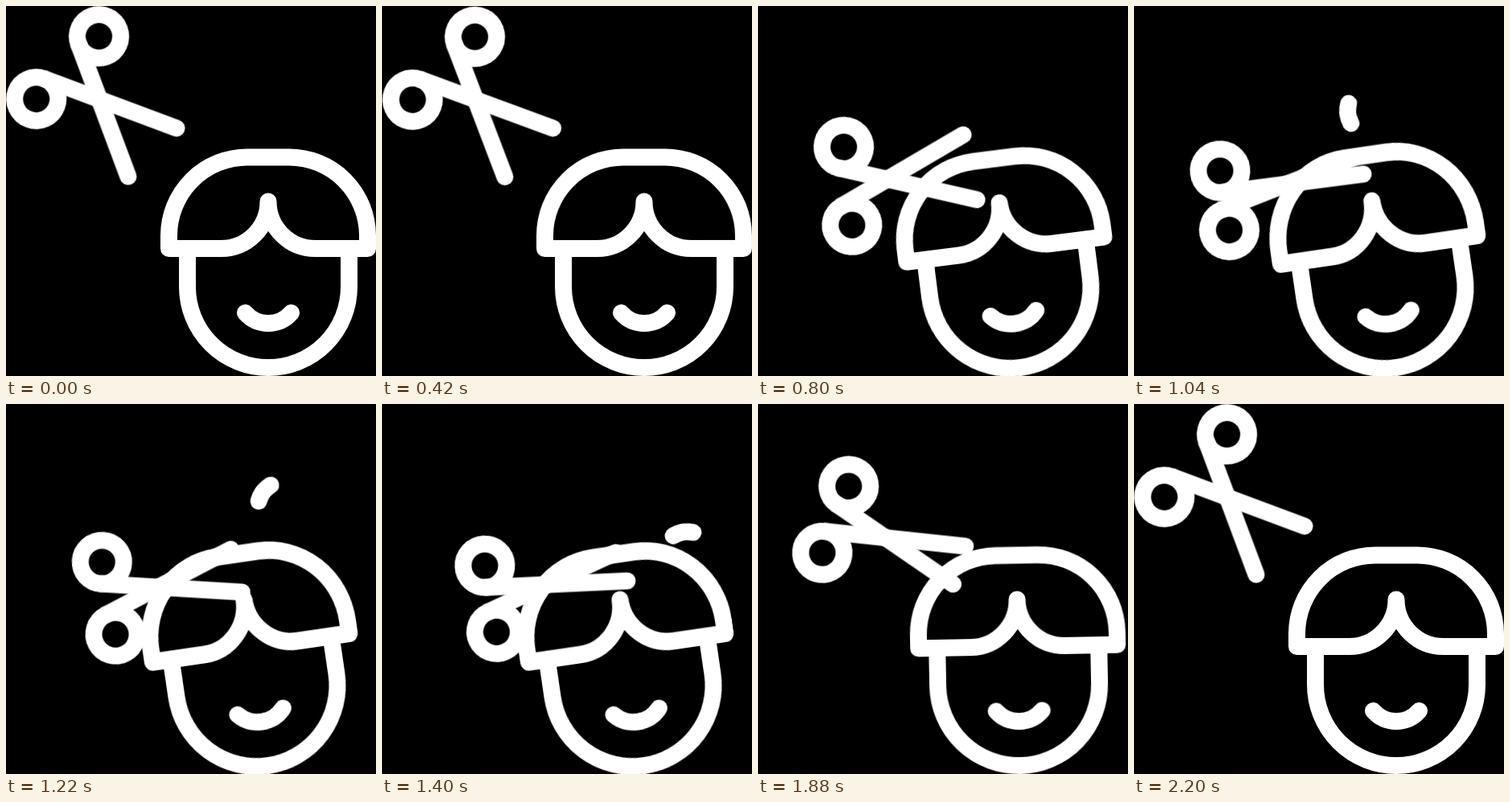
Write an HTML page that moves like this. It is 460x460 px and loops after 2.4 s.

```html
<!DOCTYPE html>
<html lang="en">
<head>
<meta charset="utf-8">
<title>Haircut</title>
<style>
html, body { margin: 0; width: 100%; height: 100%; overflow: hidden; background: #000; }
svg {
  display: block; width: 100%; height: 100%;
  fill: none; stroke: #fff; stroke-width: 21; stroke-linecap: round; stroke-linejoin: round;
}
g { animation: 2.4s linear infinite; }

.head { transform-origin: 326px 449.5px; animation-name: tilt; }
.hair { transform-origin: 326px 301.5px; animation-name: lift; }
.top { animation-name: top-blade; }
.low { animation-name: low-blade; }
.drift { animation-name: drift; }
.arc { animation-name: arc; }
.spin { animation-name: spin; }
.show { animation-name: show; }

@keyframes tilt {
  0%, 16.667% { transform: rotate(0deg); animation-timing-function: cubic-bezier(.36, 0, .4, 1); }
  41.667%, 61.667% { transform: rotate(-8.3deg); animation-timing-function: cubic-bezier(.36, 0, .4, 1); }
  86.667%, 100% { transform: rotate(0deg); }
}
/* The hair rises a little while it is cut */
@keyframes lift {
  0%, 35% { transform: scaleY(1); animation-timing-function: ease-in-out; }
  43.333% { transform: scaleY(1.045); }
  58.333% { transform: scaleY(1.03); animation-timing-function: ease-out; }
  72%, 100% { transform: scaleY(1); }
}

/* Swing in, snip twice, swing back */
@keyframes top-blade {
  0%, 16.667% { transform: translate(115.5px, 114.6px) rotate(69.5deg); animation-timing-function: cubic-bezier(.333, 0, .667, .42); }
  24.167% { transform: translate(134.3px, 151px) rotate(51deg); animation-timing-function: cubic-bezier(.333, .333, .667, .84); }
  33.333% { transform: translate(170.7px, 217.6px) rotate(13deg); animation-timing-function: cubic-bezier(.3, .4, .6, 1); }
  43.333% { transform: translate(181.9px, 222.4px) rotate(-7.4deg); animation-timing-function: cubic-bezier(.333, 0, .667, 1); }
  52.083% { transform: translate(190px, 228px) rotate(4deg); animation-timing-function: cubic-bezier(.4, 0, .75, .8); }
  58.333% { transform: translate(201px, 224.7px) rotate(-2.6deg); animation-timing-function: cubic-bezier(.3, .4, .667, 1); }
  61.667% { transform: translate(203px, 224px) rotate(-5deg); animation-timing-function: cubic-bezier(.333, 0, .667, .53); }
  78.333% { transform: translate(157px, 165.4px) rotate(34.3deg); animation-timing-function: cubic-bezier(.333, .526, .667, 1); }
  91.667%, 100% { transform: translate(115.5px, 114.6px) rotate(69.5deg); }
}
@keyframes low-blade {
  0%, 16.667% { transform: translate(114.6px, 115.5px) rotate(20.5deg); animation-timing-function: cubic-bezier(.333, 0, .667, .42); }
  24.167% { transform: translate(133.2px, 146.5px) rotate(3.6deg); animation-timing-function: cubic-bezier(.333, .333, .667, .84); }
  33.333% { transform: translate(165.3px, 212.6px) rotate(-30.4deg); animation-timing-function: cubic-bezier(.3, .3, .6, 1); }
  43.333% { transform: translate(175.6px, 227px) rotate(-21.5deg); animation-timing-function: cubic-bezier(.333, 0, .667, 1); }
  52.083% { transform: translate(188px, 229px) rotate(-28deg); animation-timing-function: cubic-bezier(.4, 0, .75, .8); }
  58.333% { transform: translate(196.3px, 228.5px) rotate(-25deg); animation-timing-function: cubic-bezier(.3, .4, .667, 1); }
  61.667% { transform: translate(198px, 228px) rotate(-22deg); animation-timing-function: cubic-bezier(.333, 0, .667, .53); }
  78.333% { transform: translate(154.6px, 166.1px) rotate(6deg); animation-timing-function: cubic-bezier(.333, .526, .667, 1); }
  91.667%, 100% { transform: translate(114.6px, 115.5px) rotate(20.5deg); }
}

/* Cut strand: steady drift and spin on a parabola */
@keyframes drift {
  0%, 38.54% { transform: translateX(232.8px); }
  62.5%, 100% { transform: translateX(403.7px); }
}
@keyframes arc {
  0%, 38.54% { transform: translateY(188px); animation-timing-function: cubic-bezier(.333, .667, .667, 1); }
  49.5% { transform: translateY(109px); animation-timing-function: cubic-bezier(.333, 0, .667, .333); }
  62.5%, 100% { transform: translateY(220px); }
}
@keyframes spin {
  0%, 38.54% { transform: rotate(-124.8deg); }
  62.5%, 100% { transform: rotate(14.2deg); }
}
@keyframes show {
  0%, 38.53% { opacity: 0; }
  38.54%, 62.49% { opacity: 1; }
  62.5%, 100% { opacity: 0; }
}
</style>
</head>
<body>
<svg viewBox="0 0 460 460">
  <g class="show"><g class="drift"><g class="arc"><g class="spin">
    <path d="M-12.5 1Q0 -4 12.5 1"/>
  </g></g></g></g>
  <g class="top">
    <path d="M104 0H-72"/>
    <circle cx="-72" cy="-27" r="27"/>
  </g>
  <g class="low">
    <path d="M104 0H-72"/>
    <circle cx="-72" cy="27" r="27"/>
  </g>
  <g class="head">
    <path d="M225.5 302V349a100.5 100.5 0 0 0 201 0V302"/>
    <g class="hair">
      <path d="M202.5 301.5V285.5A97.5 97.5 0 0 1 300 188H352A97.5 97.5 0 0 1 449.5 285.5V301.5H384.5A58.5 58.5 0 0 1 326 243A58.5 58.5 0 0 1 267.5 301.5Z"/>
    </g>
    <path d="M297.5 381.5A37.7 37.7 0 0 0 354.5 381.5"/>
  </g>
</svg>
</body>
</html>
```
